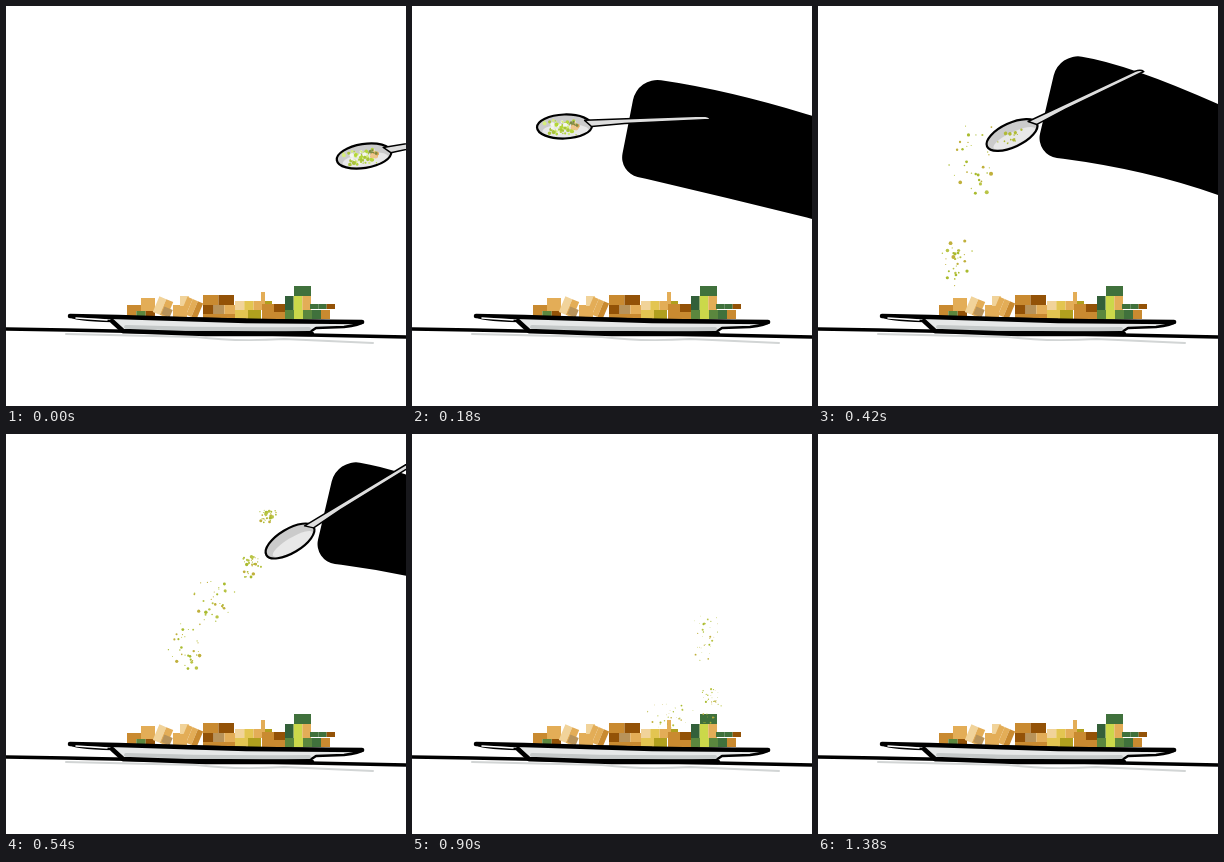
Write an HTML page with a canvas that moves like this. It is 400 by 400 pixels and loops after 1440 ms.

```html
<!DOCTYPE html>
<html lang="en">
<head>
<meta charset="utf-8">
<title>Seasoning a plate</title>
<style>
html, body { margin: 0; height: 100%; overflow: hidden; background: #fff; }
canvas { display: block; }
</style>
</head>
<body>
<canvas id="stage" width="400" height="400"></canvas>
<script>
const ctx = document.getElementById('stage').getContext('2d');
const LOOP = 1440, STEP = 60;

const cream = '#f1d39a', tan = '#e3ad57', gold = '#c98a30', brown = '#935207',
  sand = '#b8935a', yellow = '#e3c551', olive = '#b0a01e', lime = '#cbd84a',
  leaf = '#5b873e', green = '#40713c', pine = '#33603a';

const mix = (a, b, u) => a.map((v, i) => v + (b[i] - v) * u);

// Linear interpolation in rows of [time, ...values]; undefined outside their range.
function sample(keys, t) {
  const i = keys.findIndex(k => k[0] > t);
  if (i < 1) return;
  const a = keys[i - 1], b = keys[i];
  return mix(a, b, (t - a[0]) / (b[0] - a[0])).slice(1);
}

function line(d, width, color = '#000', fill) {
  const path = new Path2D(d);
  if (fill) { ctx.fillStyle = fill; ctx.fill(path); }
  ctx.strokeStyle = color;
  ctx.lineWidth = width;
  ctx.stroke(path);
}

// Equal cells side by side
function row(x, y, w, h, ...colors) {
  const cell = w / colors.length;
  colors.forEach((color, i) => {
    ctx.fillStyle = color;
    ctx.fillRect(x + i * cell, y, cell, h);
  });
}

function tilted(x, y, w, h, ...colors) {
  ctx.save();
  ctx.translate(x, y);
  ctx.rotate(.4);
  row(-w / 2, -h / 2, w, h, ...colors);
  ctx.restore();
}

// Seeded dots, densest around the middle column
function speckle(seed, count, [x, y, w, h], size, colors) {
  const rnd = () => (seed = seed * 16807 % 2147483647) / 2147483647;
  for (let i = 0; i < count; i++) {
    const dx = rnd() + rnd() - 1, dy = rnd() * 2 - 1;
    ctx.fillStyle = colors[i % colors.length];
    ctx.beginPath();
    ctx.arc(x + dx * w, y + dy * h, (.6 + 1.5 * rnd() ** 2) * size, 0, 7);
    ctx.fill();
  }
}

function drawFood() {
  row(135, 292, 14, 8, tan);
  row(121, 299, 28, 6, gold, tan);
  row(121, 305, 28, 6, gold, leaf, brown);
  row(167, 299, 14, 12, tan);
  row(174, 290, 9, 10, cream);
  tilted(157, 301, 15, 17, cream, tan);
  tilted(161, 306, 9, 8, sand);
  tilted(186, 302, 17, 17, tan, tan, gold);
  row(197, 289, 31, 10, gold, brown);
  row(197, 299, 32, 9, brown, sand, tan);
  row(197, 308, 32, 5, gold);
  row(229, 295, 37, 9, cream, yellow, tan, olive);
  row(229, 304, 26, 9, yellow, olive);
  row(255, 286, 4, 14, tan);
  row(256, 298, 24, 8, gold, brown);
  row(256, 306, 30, 8, gold);
  row(288, 280, 17, 10, green);
  row(279, 290, 26, 16, pine, lime, tan);
  row(304, 298, 25, 5, green, green, brown);
  row(279, 304, 45, 9, leaf, lime, leaf, green, gold);
}

function drawTable() {
  line('M60 328 L190 331 Q230 336 278 333 L367 337', 2, '#d2d5d5');
  line('M0 323 L60 324 L400 331', 3.6);
  drawFood();
  line('M64 310 Q66 314 107 315 L117 326 H304 L310 322 L338 321 Q354 319 357 316 Z',
    2.5, '#000', '#e6e8e8');
  line('M120 321 Q210 324 303 323', 4, '#c5c9c9');
  line('M64 310 L112 311 L240 315 L356 316', 4.5);
  line('M70 312 L101 314', 1.5, '#fff');
  line('M106 315 L117 325 L200 328 H306', 4.5);
}

// Time, bowl x, bowl y, spoon turn in degrees
const reach = [
  [0, 358, 150, -6], [60, 236, 119, -2], [120, 166, 106, 0], [240, 139, 135, 2],
  [300, 141, 142, -1], [420, 194, 129, -22], [480, 235, 111, -24],
  [540, 284, 107, -28], [720, 480, 187, -52]
];

// Around the bowl: top corner, top bend, top right, bottom right, bottom bend, bottom corner
const arms = [
  [74, -42, 154, -24, 234, -1, 234, 102, 154, 78, 55, 46],
  [71, -65, 179, -62, 259, -35, 259, 69, 179, 58, 53, 46],
  [47, -82, 116, -71, 206, -31, 206, 60, 136, 35, 23, 20]
];

function drawArm(t) {
  const [wide, level, raised] = arms;
  const [ax, ay, bx, by, cx, cy, dx, dy, ex, ey, fx, fy] = t < 300
    ? mix(wide, level, Math.max(0, (t - 120) / 180))
    : mix(level, raised, Math.min(1, (t - 300) / 120));
  const midX = (ax + fx) / 2, midY = (ay + fy) / 2;
  ctx.beginPath();
  ctx.moveTo(midX, midY);
  ctx.arcTo(ax, ay, bx, by, 25);
  ctx.quadraticCurveTo(bx, by, cx, cy);
  ctx.lineTo(cx + 240, cy + 70);
  ctx.lineTo(dx + 240, dy + 70);
  ctx.lineTo(dx, dy);
  ctx.quadraticCurveTo(ex, ey, fx + (ex - fx) / 4, fy + (ey - fy) / 4);
  ctx.arcTo(fx, fy, midX, midY, 20);
  ctx.fillStyle = '#000';
  ctx.fill();
}

function ellipse(x, y, rx, ry) {
  ctx.beginPath();
  ctx.ellipse(x, y, rx, ry, -.05, 0, 7);
}

function drawSpoon(t) {
  const pose = sample(reach, t);
  if (!pose) return;
  ctx.save();
  ctx.translate(pose[0], pose[1]);
  drawArm(t);
  ctx.rotate(pose[2] * Math.PI / 180);
  ellipse(0, 0, 27.5, 12);
  ctx.fillStyle = '#cbcbcb';
  ctx.fill();
  ellipse(1, 4, 23, 6.5);
  ctx.fillStyle = '#e8e8e8';
  ctx.fill();
  if (t < 240) {
    speckle(77, 70, [-3, 1, 20, 7], 1.1, ['#b4d63a', '#a9c43a', '#d6ee7c', '#f4f6ec']);
    speckle(5, 16, [12, -2, 8, 4], 1.3, ['#e0a45c', '#efc58c', '#e0a45c', '#7c8a42']);
  } else if (t < 540) {
    speckle(31, 16, [0, 2, 17, 6], 1, ['#b0ba35']);
  }
  ellipse(0, 0, 27.5, 12);
  ctx.strokeStyle = '#000';
  ctx.lineWidth = 2.2;
  ctx.stroke();
  line('M20 -6.5 L138 -13 Q144 -13 146 -9.5 L60 -4 L27 -.5 Z', 1.5, '#000', '#dedede');
  ctx.restore();
}

// Falling clouds, rows of [time, x, y, half width, half height]
const clouds = [
  [[240, 128, 196, 18, 36], [300, 134, 216, 22, 40], [540, 146, 294, 15, 10]],
  [[300, 148, 117, 24, 13], [420, 155, 155, 28, 35], [720, 218, 300, 10, 6]],
  [[480, 205, 140, 14, 12], [660, 220, 222, 40, 36], [960, 270, 297, 22, 6]],
  [[480, 240, 112, 10, 6], [660, 258, 172, 16, 22], [960, 310, 295, 12, 18]],
  [[540, 262, 82, 11, 7], [900, 294, 203, 16, 26], [1320, 345, 322, 24, 6]]
];

function drawDust(t) {
  const size = Math.min(1, 1.35 - t / 1100);
  clouds.forEach((keys, i) => {
    const cloud = sample(keys, t);
    if (cloud) speckle(911 + i * 5077, 32, cloud, size, ['#a9bb2e', '#b9c445', '#c0b03c']);
  });
}

function draw() {
  const t = Math.floor(performance.now() % LOOP / STEP) * STEP;
  ctx.fillStyle = '#fff';
  ctx.fillRect(0, 0, 400, 400);
  ctx.lineCap = ctx.lineJoin = 'round';
  drawTable();
  drawSpoon(t);
  drawDust(t);
  requestAnimationFrame(draw);
}
draw();
</script>
</body>
</html>
```
